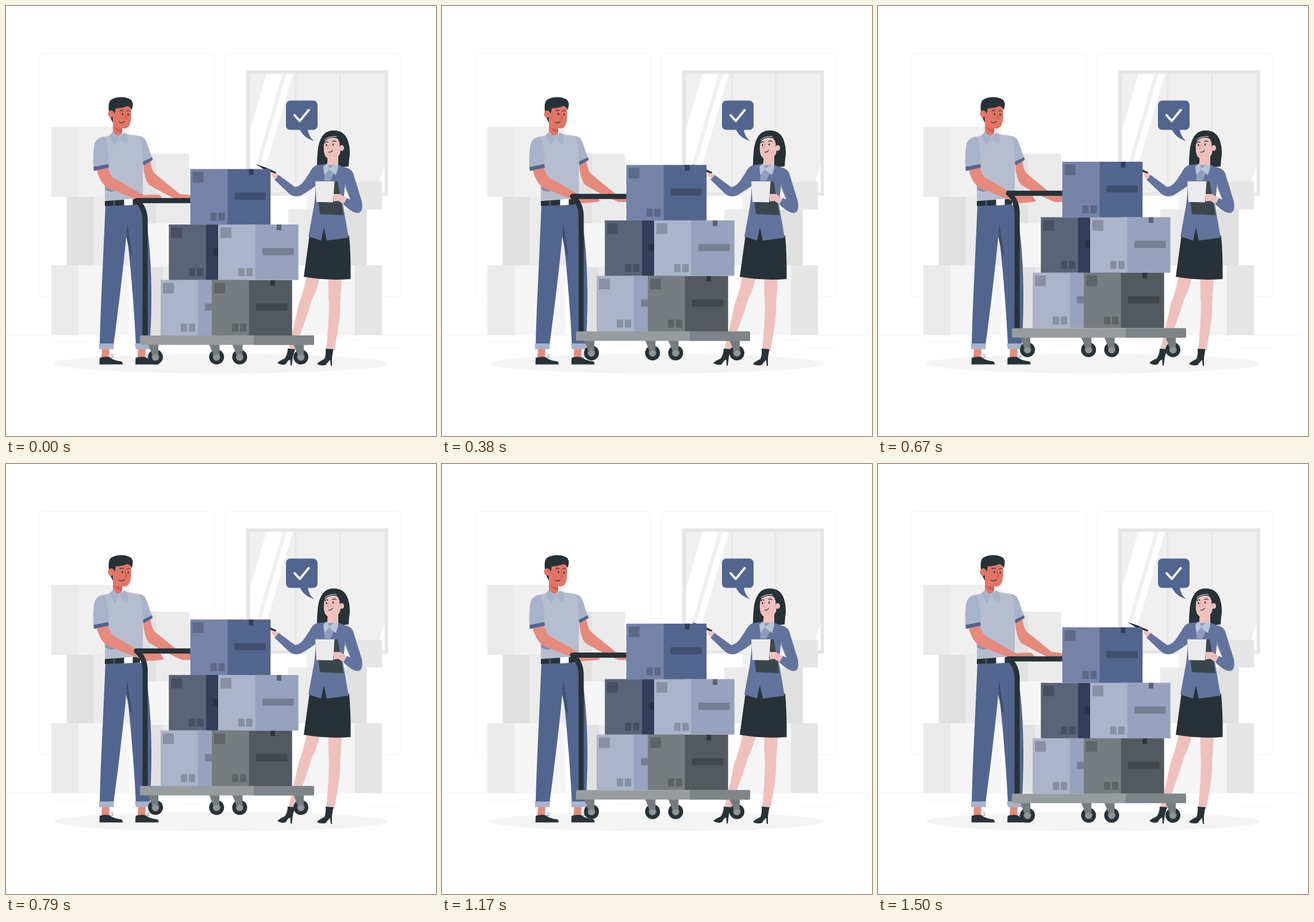
These frames come from a looping animation (748 px wide and 748 px high, 1540 ms). An HTML page:

```html
<!DOCTYPE html>
<html lang="en">
<head>
<meta charset="utf-8">
<title>Warehouse trolley</title>
<style>
  html, body { margin: 0; width: 100%; height: 100%; overflow: hidden; background: #fff; }
  svg { display: block; width: 100%; height: 100%; }
  .ink { fill: #263238; }
  .navy { fill: #52658f; }
  .shirt { fill: #b6bdcf; }
  .pale { fill: #a7b3ca; }
  .skin { fill: #e58a7c; }
  .face { fill: #e27566; }
  .rose { fill: #efc1bd; }
  .coat { fill: #62749d; }
  .line { fill: none; stroke: #263238; stroke-linecap: round; stroke-linejoin: round; }
</style>
</head>
<body>
<svg viewBox="0 0 748 748" xmlns="http://www.w3.org/2000/svg">
  <g id="room">
    <g fill="none" stroke="#f4f4f4">
      <rect x="57.5" y="82.5" width="305" height="423" rx="7"/>
      <rect x="381" y="82.5" width="306" height="423" rx="7"/>
      <path d="M0 572.5H748M80 584.5H145M592 582H623M625 596H687M300 591H340"/>
    </g>
    <rect x="418" y="112" width="246.500" height="218" fill="#e6e6e6"/>
    <rect x="424.500" y="118" width="234" height="206" fill="#f0f0f0"/>
    <path d="M453 118H481L424.500 313V216ZM488 118H499L439 324H428ZM658.500 275V324H644Z" fill="#fff"/>
    <path d="M504 118V324M580.500 118V324" stroke="#e6e6e6" stroke-width="3"/>
    <g id="crates"></g>
  </g>
  <ellipse cx="374" cy="622" rx="290" ry="17" fill="#f4f4f4"/>

  <g id="bubble">
    <rect class="navy" x="487" y="164.500" width="55" height="51" rx="7.500"/>
    <path class="navy" d="M511 214Q517 229 536 235Q526 227 525 214Z"/>
    <path d="M502 190L511 200L526.500 181" fill="none" stroke="#fff" stroke-width="4" stroke-linecap="round" stroke-linejoin="round"/>
  </g>

  <g id="man">
    <path class="skin" d="M239 276L251 269Q253 284 258 291L302 327L322 329V341H307Q276 328 249 311Q240 300 239 276Z"/>
    <path class="pale" d="M231 226Q241 227 245 238L254 265L239 275L232 262Z"/>
    <path class="navy" d="M254 263L255 268L239 277L238 271Z"/>
    <path class="navy" d="M173 346H238Q252 400 253 500Q253 550 250 590H226Q221 490 210 392Q203 470 187 590H163Q164 540 168 460Z"/>
    <path d="M211 376L220 436L215 428L209 400Z" fill="#3f4e71"/>
    <path class="skin" d="M167 595H180L179 612H166ZM230 595H243L242 612H229Z"/>
    <path class="pale" d="M161.500 587H188L187 597H162ZM224 587H251L250 597H226Z"/>
    <g id="shoe">
      <path class="ink" d="M163 612Q172 609 180 611Q188 617 200 618Q203 619 203 623.500H162.500Z"/>
      <path d="M179 611L184 606L187 608L182 612L187 611" fill="none" stroke="#8793ad" stroke-width="1"/>
    </g>
    <use href="#shoe" x="62.500"/>
    <path class="shirt" d="M165 229L188 223H211L232 226Q239 244 238 290V338H172V285Z"/>
    <path d="M172 314L190 322L183 323Q174 322 172 317Z" fill="#8290af"/>
    <path class="ink" d="M172 339L233 335.500V345.500L172 348Z"/>
    <path d="M205.500 336.500L220.500 335.500V346L205.500 347Z" fill="#fff"/>
    <path d="M188 338V348" stroke="#8b95a4"/>
    <path class="skin" d="M158 286L177 280Q180 293 187 299L240 329L264 328Q269 328 271 334L275 339L270 341L243 343L229 337L176 316Q164 308 158 286Z"/>
    <path class="pale" d="M171 227Q157 229 154 240Q151 254 152 281L178 277Q180 247 171 227Z"/>
    <path class="navy" d="M152 280L178 275L179 281L153 287Z"/>
    <path class="face" d="M186 199V222Q192 229 202 222V207Z"/>
    <path d="M187 209Q192 215 202 214V220Q192 219 187 209Z" fill="#cd5a50"/>
    <path class="pale" d="M186 219L180 225L189 243L198 229ZM198 229L205 220L211 223L212 237L207 240Z"/>
    <path class="face" d="M184 178L216 173Q219 184 217 199Q215 213 206 213Q194 213 187 203Z"/>
    <path class="ink" d="M179 184Q177 167 183 163Q192 157 207 159Q219 161 220.500 169Q221 174 218.500 181Q217 176 212 174Q201 178 191 178Q190 187 186 193V203Q180 193 179 184Z"/>
    <ellipse class="face" cx="183" cy="188" rx="5.500" ry="6.500"/>
    <g class="line" stroke-width="1.200">
      <path d="M198 183Q200 180 204 182M210 183Q213 180 215 183M197 202Q202 205 206 201"/>
    </g>
    <path d="M207 188L210 197L206 197" fill="none" stroke="#c84f49" stroke-width="1.200"/>
    <ellipse class="ink" cx="202.500" cy="188" rx="1.200" ry="2"/>
    <ellipse class="ink" cx="212.500" cy="189" rx="1.200" ry="2"/>
  </g>

  <g id="woman">
    <path class="rose" d="M523 470H546Q543 490 532 511Q527 530 502 599L491 598Q501 558 509 519Q519 493 523 470ZM561 472H584Q583 497 581 516Q583 541 571 599H557Q561 558 562 521Q560 496 561 472Z"/>
    <path class="ink" d="M490 596L503 597L499 610L497 625.500H495L494.500 615Q490 616 487 623Q480 626 472 621Q474 618 485 613Q490 606 490 596Z"/>
    <path class="ink" d="M556 596L569.500 597L567 612V626H565L564 616Q561 617 557 624Q550 627 541 623Q543 619 554 614Q557 606 556 596Z"/>
    <path class="ink" d="M528 398L545 382H562L597 400Q600 432 599.500 475Q558 478 518 471Z"/>
    <path class="ink" d="M541 277Q541 260 543 246Q548 217 569 216.500Q589 216 595 235Q600 250 597 266L596 279Q570 283 541 277Z"/>
    <path class="coat" d="M541 277Q533 279 528 290L518 305Q511 314 503 315L473 293L467 302L491 325Q502 335 514 329Q528 321 540 312Z"/>
    <path class="rose" d="M474 294L465 286L459 283L458 286L462 289L463 296L469 301Z"/>
    <path class="ink" d="M434 275L451 280.500L470 289L469 291.500L450 285Z"/>
    <path class="coat" d="M539 277L556 275L574 275L588 280Q592 300 586 345L596 403L558 408L553 385L548 408L526 401L536 346Q540 315 539 277Z"/>
    <path class="rose" d="M560 258H578V278Q569 290 558 285Z"/>
    <path d="M553 277L576 276L570 292L564 304H554Z" fill="#8f9dbb"/>
    <path d="M558 274L552 280L554 294L563 283ZM574 274L578 281L574 294L561 284Z" fill="#b9c6d8"/>
    <path class="rose" d="M556 230Q570 223 580 231Q584 241 581 257Q576 267 565 267Q554 266 553 252Q552 237 556 230Z"/>
    <path class="ink" d="M551 248Q552 230 558 225Q572 220 584 231L586 256L580 248Q582 236 576 230Q563 227 556 234Q553 239 551 248Z"/>
    <path d="M554 233Q561 226 575 227" fill="none" stroke="#e9ecef" stroke-width="1"/>
    <ellipse class="rose" cx="584" cy="247" rx="4" ry="5"/>
    <path class="line" d="M555 238Q558 235 560 237M568 236Q571 233 574 236M561 254Q566 255 568 251" stroke-width="1.200"/>
    <path d="M562 240L559 248L562 249" fill="none" stroke="#d89391" stroke-width="1.100"/>
    <ellipse class="ink" cx="557.500" cy="242" rx="1.200" ry="1.900"/>
    <ellipse class="ink" cx="569" cy="241" rx="1.200" ry="1.900"/>
    <path d="M540 308L577 305L587 364L546 362Z" fill="#3b464c"/>
    <path d="M538 305H571.500L569 341.500L540 341Z" fill="#ebebed"/>
    <path class="rose" d="M570 327L581 327L592 334L588 345L578 339L570 340Z"/>
    <path class="coat" d="M585 280Q600 281 604 291L619 340Q622 358 613 360Q603 361 587 345L593 334L600 337L589 309Z"/>
    <path d="M587 308L600 337" stroke="#4a5b85"/>
  </g>

  <g id="cart">
    <path class="line" stroke-width="9" d="M322 338.800H227Q241 350 242 371V576"/>
    <g id="boxes"></g>
    <g id="wheels"></g>
    <rect x="233" y="573.500" width="303" height="16.500" rx="2" fill="#979c9f"/>
    <path d="M431 573.500H534Q536 573.500 536 575.500V588Q536 590 534 590H431Z" fill="#7e8588"/>
  </g>
</svg>
<script>
  const $ = id => document.getElementById(id);
  const rect = (x, y, w, h, fill, more = '') =>
    `<rect x="${x}" y="${y}" width="${w}" height="${h}" fill="${fill}" ${more}/>`;
  const shade = a => `opacity="${a}"`;

  // Pale crates: x, y, split, right edge, height, left tone, right tone
  $('crates').innerHTML = [
    [182, 257, 261, 318.5, 121, '#e2e2e2', '#ebebeb'],
    [214, 378, 248, 318, 76, '#ebebeb', '#f5f5f5'],
    [225, 454, 273, 318, 118, '#e1e1e1', '#ebebeb'],
    [79, 210, 126, 214, 122, '#ebebeb', '#f0f0f0'],
    [105.5, 332, 152.5, 240, 121, '#e0e0e0', '#ebebeb'],
    [79, 451, 126, 214, 121.5, '#ebebeb', '#f5f5f5'],
    [523, 305.5, 607, 654, 48.5, '#f1f1f1', '#e6e6e6'],
    [491, 354, 580, 627.5, 97, '#ebebeb', '#e0e0e0'],
    [519, 451, 607, 654, 121.5, '#f5f5f5', '#e6e6e6']
  ].map(([x, y, m, r, h, a, b]) => rect(x, y, m - x, h, a) + rect(m, y, r - m, h, b)).join('');

  const box = (x, y, side, front) =>
    rect(x, y, 65, 96.5, side) + rect(x + 64.7, y, 75, 96.5, front) +
    rect(x + 4, y + 5, 19, 18.5, '#000', shade(.2)) +
    [35, 49].map(d => rect(x + d, y + 76, 11, 14, '#000', 'rx="1.2" ' + shade(.2))).join('') +
    rect(x + 102, y, 8, 10, '#000', shade(.4)) +
    rect(x + 77, y + 41, 54.5, 12.5, '#000', shade(.22));

  $('boxes').innerHTML = [
    [269, 477, '#aab4ca', '#97a2be'],
    [358, 477, '#757d80', '#525a5f'],
    [283.3, 380.5, '#596479', '#323e5a'],
    [369, 380.5, '#aab4ca', '#97a2be'],
    [320.5, 284, '#7683a9', '#52658f']
  ].map(b => box(...b)).join('');

  $('wheels').innerHTML = [260, 366.3, 406.5, 513].map(x =>
    `<g transform="translate(${x} 611)"><circle class="ink" r="13"/>
     <circle r="6.500" fill="#8a9194"/>
     <path d="M-13 -22H5V-1A5 5 0 0 1 -4 2L-8 -10Z" fill="#737c7f"/>
     <circle r="4.500" fill="#8f9699"/></g>`).join('');

  // Vertical drift of the trolley: time, offset
  const LOOP = 1540, STEP = 1000 / 24;
  const keys = [[0, -.4], [740, -14.5], [1500, .1]];

  function drift(t) {
    const i = t < keys[1][0] ? 0 : 1;
    const [t0, a] = keys[i], [t1, b] = keys[i + 1];
    return a + (b - a) * (t - t0) / (t1 - t0);
  }

  const cart = $('cart');
  function draw(now) {
    const t = Math.floor((now % LOOP) / 10) * 10;
    const n = Math.min(36, Math.floor((t + 4.99) / STEP));
    cart.setAttribute('transform', `translate(0 ${drift(n * STEP).toFixed(2)})`);
  }

  const start = performance.now();
  (function tick() {
    draw(performance.now() - start);
    requestAnimationFrame(tick);
  })();
</script>
</body>
</html>
```
